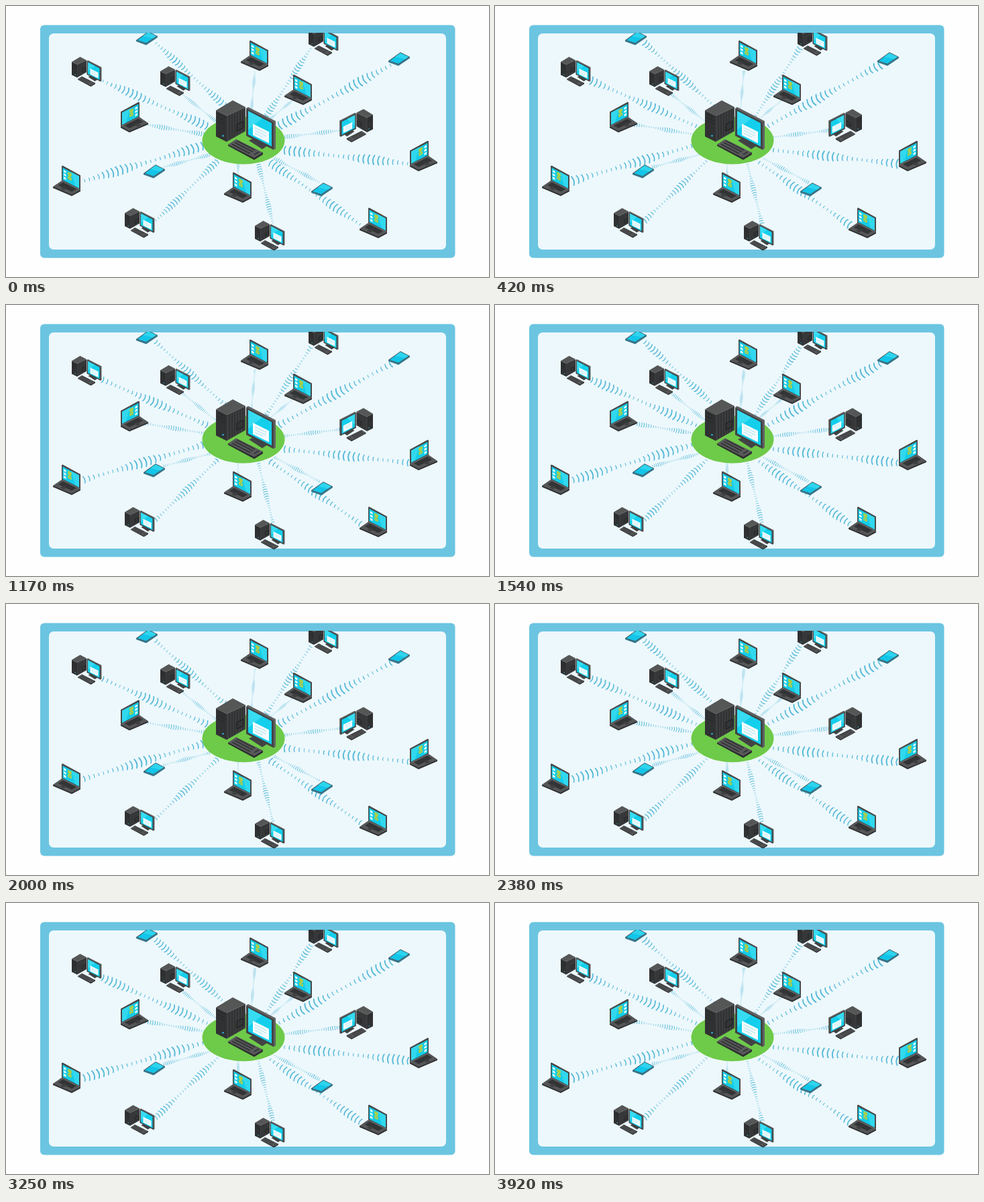
Write an HTML page that moves like this. It is 720x405 px and loops after 3960 ms.

```html
<!DOCTYPE html>
<html lang="en">
<head>
<meta charset="utf-8">
<title>Connected devices</title>
<style>
html, body { margin: 0; width: 100%; height: 100%; overflow: hidden; background: #fefefe; }
svg { display: block; width: 100vw; height: 100vh; }
</style>
</head>
<body>
<svg viewBox="0 0 720 405" xmlns="http://www.w3.org/2000/svg">
  <defs>
    <clipPath id="below-top"><path d="M0 40H720V405H0z"/></clipPath>

    <g id="pc">
      <path d="M0 15L25 0L44 10L16 23z" fill="#555656"/>
      <path d="M0 15L16 23V62L0 54z" fill="#303132"/>
      <path d="M16 23L44 10V46L16 62z" fill="#3d3e3f"/>
      <path d="M20 23V58M24 21V56M28 19V54M32 17V51M36 15V49M40 13V47M2 20L14 26M2 25L14 31M2 30L14 36" fill="none" stroke="#252627" stroke-width="1"/>
      <path d="M31 36L41 31V41L31 46z" fill="#333435" stroke="#191a1b"/>
      <circle cx="10.500" cy="53" r="1.300" fill="#28bde4"/>
      <path d="M49 60L57 56L78 67L69 73z" fill="#424344"/>
      <path d="M61 50L69 54V66L61 62z" fill="#343536"/>
      <path d="M45 12L48 10L89 31V72L86 74z" fill="#606162"/>
      <path d="M45 12L86 33V74L45 53z" fill="#414344"/>
      <path d="M48 16L83 34V69L48 51z" fill="#13cfec"/>
      <path d="M48 16L69 27L48 44z" fill="#37dcf2"/>
      <path d="M55 35L79 47V64L55 52z" fill="#f2fbfd"/>
      <path d="M58 41L75 49.500M58 45L75 53.500M58 49L70 55" stroke="#b5e5f0" stroke-width="1.200"/>
      <path d="M18 66V68L57 89L70 81V78z" fill="#2c2d2e"/>
      <path d="M18 66L30 58L70 78L57 86z" fill="#58595a"/>
      <path d="M24 65.500L51 79.500M28 63L55 77M31 60.500L58 74.500M57 81L64 77" stroke="#303132" stroke-width="1.700"/>
    </g>

    <g id="laptop">
      <path d="M0 31V33L28 45L41 38V36z" fill="#2d2e2f"/>
      <path d="M0 31L13 22L41 36L28 43z" fill="#555657"/>
      <path d="M8 29L15 24.500L35 34.500L28 38.500z" fill="#333435"/>
      <path d="M11 34L16 31L21 33.500L16 36.500z" fill="#3e3f40"/>
      <path d="M13 0L14.500 -.5L41 14V36L13 22z" fill="#47494a"/>
      <path d="M14.500 2.500L39 15.500V33.500L14.500 21z" fill="#13cce9"/>
      <path d="M27 9L39 15.500V33.500L33 30z" fill="#31d8ee"/>
      <path d="M16 6L19.500 8V11L16 9zM16 11L19.500 13V16L16 14zM16 16L19.500 18V21L16 19z" fill="#effbfc"/>
      <path d="M23 10L27 12V15L23 13zM23 16L27 18V21L23 19zM25 12V18" fill="none" stroke="#c3cf32" stroke-width="1.400"/>
    </g>

    <g id="phone">
      <path d="M0 13V15L15 20.500L32 9V7z" fill="#397b91"/>
      <path d="M0 13L18 0L32 7L15 18.500z" fill="#455d66"/>
      <path d="M2 13L18 1.200L30 7L15 17.200z" fill="#13c5e8"/>
      <path d="M10 7.100L18 1.200L30 7L25 10.400z" fill="#2dd4ee"/>
    </g>
  </defs>

  <rect width="720" height="405" fill="#fefefe"/>
  <rect x="51" y="28.500" width="618.500" height="348" rx="6" fill="#6bc5e1"/>
  <rect x="64" y="41" width="592" height="323" rx="7" fill="#edf8fc"/>
  <g id="waves" fill="none" stroke="#55b9d7"/>
  <ellipse cx="354" cy="201" rx="61.500" ry="35.500" fill="#6eca49"/>
  <g id="devices" clip-path="url(#below-top)"/>
</svg>
<script>
const NS = 'http://www.w3.org/2000/svg';
const FRAME_MS = 41.68, LOOP_MS = 3960, CYCLE_FRAMES = 21;
const ARCS = 26, SPACING = 0.6, START = 0.3;

function add(parent, tag, attrs) {
  const el = document.createElementNS(NS, tag);
  for (const key in attrs) el.setAttribute(key, attrs[key]);
  return parent.appendChild(el);
}

// Negative horizontal scale mirrors the device.
const devices = [
  ['phone', 194, 38], ['phone', 570, 69], ['phone', 205, 237], ['phone', 455, 264],
  ['laptop', 70, 239], ['laptop', 350, 52], ['laptop', 415, 103],
  ['laptop', 325, 249], ['laptop', 527, 302],
  ['laptop', 212, 144, -1, 1], ['laptop', 643, 202, -1, 1],
  ['pc', 98, 76, .5, .5], ['pc', 230, 90, .5, .5], ['pc', 451, 30, .5, .5],
  ['pc', 177, 302, .5, .5], ['pc', 371, 321, .5, .5],
  ['pc', 547, 154, -.56, .56], ['pc', 313, 141]
];
const deviceLayer = document.getElementById('devices');
for (const [id, x, y, sx = 1, sy = 1] of devices) {
  add(deviceLayer, 'use', { href: '#' + id, transform: `translate(${x} ${y}) scale(${sx} ${sy})` });
}

// Each link runs from a device to the hub: x1, y1, x2, y2.
const links = [
  [142, 111, 303, 181], [222, 54, 328, 151], [455, 62, 387, 166],
  [576, 87, 404, 181], [602, 236, 411, 215], [530, 328, 391, 232],
  [222, 322, 317, 230], [114, 262, 297, 208], [398, 326, 376, 235],
  [371, 97, 366, 154], [263, 132, 315, 174], [431, 138, 391, 171],
  [207, 177, 297, 192], [498, 186, 414, 196], [234, 241, 305, 222],
  [468, 264, 399, 227], [346, 286, 346, 232]
];
const waveLayer = document.getElementById('waves');
const arcs = [];
for (const [x1, y1, x2, y2] of links) {
  const length = Math.hypot(x2 - x1, y2 - y1);
  const angle = Math.atan2(y2 - y1, x2 - x1) * 180 / Math.PI;
  const group = add(waveLayer, 'g', { transform: `translate(${x1} ${y1}) rotate(${angle})` });
  for (let i = 0; i < ARCS; i++) {
    arcs.push({ el: add(group, 'path', {}), length, along: (i + .5) / ARCS });
  }
}

function draw(time) {
  const frame = Math.floor((time % LOOP_MS + 5) / FRAME_MS);
  const phase = frame / CYCLE_FRAMES;
  for (const { el, length, along } of arcs) {
    const offset = (along - START) / SPACING - phase;
    const swell = Math.pow(.5 + .5 * Math.cos(2 * Math.PI * offset), 1.25);
    const half = length * (.012 + .027 * swell);
    const x = along * length, bulge = half * .3;
    el.setAttribute('d', `M${x - bulge} ${-half}Q${x + bulge} 0 ${x - bulge} ${half}`);
    el.setAttribute('stroke-width', .2 + length * (.0045 + .0045 * swell));
  }
}

const start = performance.now();
function tick() {
  draw(performance.now() - start);
  requestAnimationFrame(tick);
}
tick();
</script>
</body>
</html>
```
